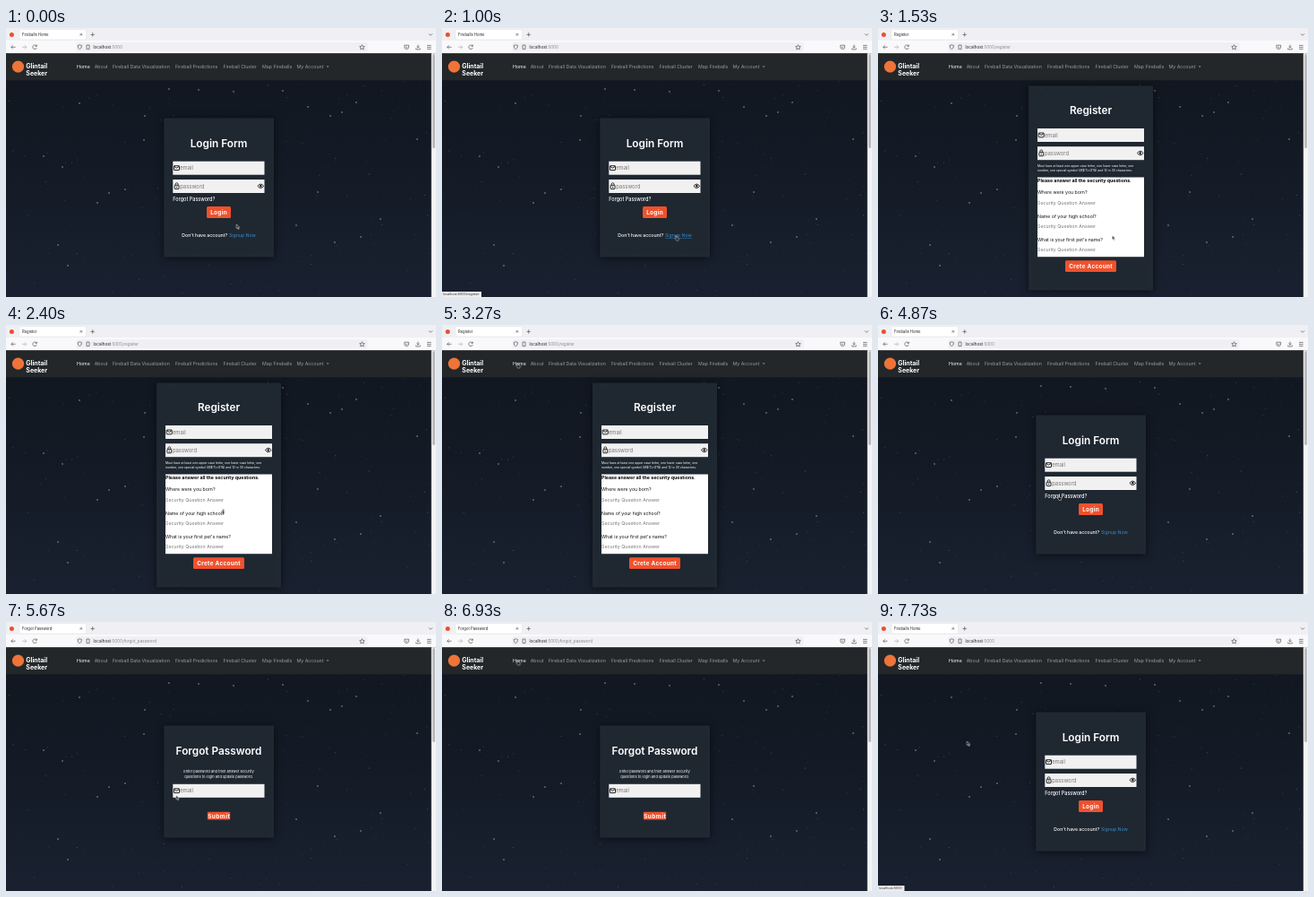
An HTML page for the animation above (7.79 s loop, 480 by 300 pixels).

```html
<!DOCTYPE html>
<html lang="en">
<head>
<meta charset="utf-8">
<title>Login walkthrough</title>
<style>
html, body { margin: 0; width: 100%; height: 100%; overflow: hidden; }
svg { display: block; width: 480px; height: 300px; font-family: Inter, sans-serif; }
.mid { text-anchor: middle; }
.title { font-size: 11.8px; font-weight: 600; fill: #fff; text-anchor: middle; }
.nav { font-size: 5.25px; fill: #9b9d9e; }
.brand { font-size: 7px; font-weight: 700; fill: #fff; }
.hint { font-size: 5.9px; fill: #777; }
.note { font-size: 3.4px; fill: #fff; }
.btn { font-size: 6.4px; font-weight: 700; fill: #fff; letter-spacing: .3px; text-anchor: middle; }
.bar { font-size: 4.6px; fill: #222; }
.tab { font-size: 4.2px; fill: #222; }
.status { font-size: 3.65px; fill: #333; }
.ask { font-size: 5.2px; fill: #111; }
.answer { font-size: 5.3px; fill: #777; }
.card { fill: #222a34; fill-opacity: .93; filter: drop-shadow(0 1px 4px #0009); }
.line { fill: none; stroke: #555; stroke-width: .7; }

.page, .status-box, .shape, #hover { animation: 7790ms step-end infinite; opacity: 0; }
.login { animation-name: login; }
.register { animation-name: register; }
.forgot { animation-name: forgot; }
.to-register { animation-name: to-register; }
.to-home { animation-name: to-home; }
.to-forgot { animation-name: to-forgot; }
.arrow { animation-name: arrow; }
.hand { animation-name: hand; }
.beam { animation-name: beam; }
#hover { animation-name: hover; }
#cursor { animation: move 7790ms ease-in-out infinite; }

@keyframes login { 0%, 44.2%, 93.1% { opacity: 1 } 17.1%, 70.2% { opacity: 0 } 100% { opacity: 1 } }
@keyframes register { 0%, 44.2%, 100% { opacity: 0 } 17.1% { opacity: 1 } }
@keyframes forgot { 0%, 93.1%, 100% { opacity: 0 } 70.2% { opacity: 1 } }
@keyframes to-register { 0%, 17.9%, 100% { opacity: 0 } 10.2% { opacity: 1 } }
@keyframes to-home { 0%, 53.1% { opacity: 0 } 42%, 90.2%, 100% { opacity: 1 } }
@keyframes to-forgot { 0%, 71%, 100% { opacity: 0 } 65.1% { opacity: 1 } }
@keyframes hover { 0%, 17.1%, 100% { opacity: 0 } 9.4% { opacity: 1 } }
@keyframes arrow {
  0%, 17.5%, 33.5%, 46%, 71%, 94% { opacity: 1 }
  9.4%, 27%, 40.5%, 57.3%, 84% { opacity: 0 }
  100% { opacity: 1 }
}
@keyframes hand {
  0%, 17.5%, 46%, 71%, 94%, 100% { opacity: 0 }
  9.4%, 40.5%, 57.3%, 84% { opacity: 1 }
}
@keyframes beam { 0%, 33.5%, 100% { opacity: 0 } 27% { opacity: 1 } }
@keyframes move {
  0%, 1% { transform: translate(257.3px, 219px) }
  10%, 20.5% { transform: translate(261.5px, 231.5px) }
  28%, 32% { transform: translate(242.5px, 206.5px) }
  41%, 45% { transform: translate(84.5px, 42.5px) }
  49%, 52.2% { transform: translate(113.4px, 158px) }
  58.2%, 64% { transform: translate(202px, 190px) }
  68%, 75.4% { transform: translate(189.8px, 193.2px) }
  84.7%, 94.5% { transform: translate(84.5px, 42.5px) }
  98.5%, 100% { transform: translate(99.4px, 133px) }
}
</style>
</head>
<body>
<svg viewBox="0 0 480 300">
  <defs>
    <linearGradient id="sky" x2="0" y2="1">
      <stop offset="0" stop-color="#10161e"/>
      <stop offset=".5" stop-color="#131a25"/>
      <stop offset="1" stop-color="#192130"/>
    </linearGradient>
    <g id="mail">
      <rect x=".6" y="-2.3" width="6" height="4.8" rx=".5" fill="none" stroke="#111" stroke-width=".9"/>
      <path d="M.8-1.8 3.6.2 6.4-1.8" fill="none" stroke="#111" stroke-width=".9"/>
    </g>
    <g id="lock">
      <rect x="1.3" y="-1" width="4.8" height="4.2" rx=".5" fill="none" stroke="#111" stroke-width=".9"/>
      <path d="M2.3-1V-2.2a1.4 1.4 0 0 1 2.8 0V-1" fill="none" stroke="#111" stroke-width=".8"/>
      <circle cx="3.7" cy="1.1" r=".7" fill="#111"/>
    </g>
    <g id="eye">
      <path d="M-3.4 0Q0-4.4 3.4 0 0 4.4-3.4 0Z" fill="none" stroke="#111" stroke-width=".9"/>
      <circle r="1.2" fill="#111"/>
    </g>
  </defs>

  <rect width="480" height="300" fill="url(#sky)"/>
  <g id="stars"></g>

  <!-- Browser -->
  <rect width="480" height="14" fill="#f0f0f4"/>
  <rect y="14" width="480" height="14.5" fill="#f9f9fb"/>
  <rect x="15" y="1.5" width="74.5" height="11.5" rx="1.5" fill="#fff" stroke="#d8d8de" stroke-width=".4"/>
  <circle cx="6.4" cy="7.4" r="2.5" fill="#e8502f"/>
  <rect x="78.5" y="16.2" width="325" height="10" rx="1.5" fill="#f0f0f4"/>
  <g class="line">
    <path d="M82.6 6l2.6 2.6m0-2.6-2.6 2.6M94.5 7.4h4.4m-2.2-2.2v4.4M472 6.3l2 2 2-2"/>
    <path d="M10.6 21.3H5.8m2-2-2 2 2 2"/>
    <path d="M18 21.3h4.8m-2-2 2 2-2 2" stroke="#b0b0b5"/>
    <path d="M34 20a2.3 2.3 0 1 0 .3 2M34.4 18.6v1.8h-1.8"/>
    <path d="M82.3 18.8l2.2.7q0 3.2-2.2 4.4-2.2-1.2-2.2-4.4zM90 19h3v4.6h-3z"/>
    <path d="M397.5 18.7l.8 1.8 2 .2-1.5 1.3.4 2-1.7-1-1.7 1 .4-2-1.5-1.3 2-.2z"/>
    <path d="M444.8 19.2h4.8v2a2.4 2.4 0 0 1-4.8 0zM446 20.8l1.2 1.1 1.2-1.1"/>
    <path d="M460 18.5v3.6m-1.6-1.5 1.6 1.6 1.6-1.6M457.7 22.5v1.4h4.6v-1.4"/>
    <path d="M470 19.4h4.6m-4.6 2h4.6m-4.6 2h4.6"/>
  </g>

  <!-- Navigation -->
  <rect y="28.3" width="475" height="30" fill="#232729"/>
  <circle cx="13.5" cy="43.2" r="6.6" fill="#ee7439"/>
  <text class="brand" x="22.3" y="45.4">Glintail</text>
  <text class="brand" x="22.3" y="53.4">Seeker</text>
  <g id="nav"></g>
  <path d="M357.7 42.5h2.8l-1.4 1.6z" fill="#9b9d9e"/>
  <rect x="474.8" y="28.3" width="5.2" height="272" fill="#f3f3f3"/>
  <rect x="476" y="29" width="3" height="105" rx="1.5" fill="#bcbcbe"/>

  <g class="page login">
    <text class="tab" x="18" y="9">Fireballs Home</text>
    <text class="bar" x="97.5" y="23">localhost<tspan fill="#888">:5000</tspan></text>
    <rect class="card" x="176.3" y="100.5" width="122.7" height="155" rx="1"/>
    <text class="title" x="237.5" y="132.8">Login Form</text>
    <g data-field="186.3 148.7 102.2 mail"></g>
    <g data-field="186.3 169 102.2 lock"></g>
    <text x="186.3" y="193.2" font-size="5.5" font-weight="500" fill="#fff">Forgot Password?</text>
    <rect x="224" y="199" width="27" height="13" rx="1.5" fill="#f0512d"/>
    <text class="btn" x="237.6" y="207.8">Login</text>
    <text x="196.3" y="233.3" font-size="5.2" font-weight="500" fill="#fff">Don't have account?</text>
    <text x="249" y="233.3" font-size="5.2" fill="#3b8ccc">Signup Now</text>
    <path id="hover" d="M249 234.3h29.5" stroke="#3b8ccc" stroke-width=".5"/>
  </g>

  <g class="page register">
    <text class="tab" x="18" y="9">Register</text>
    <text class="bar" x="97.5" y="23">localhost<tspan fill="#888">:5000/register</tspan></text>
    <rect class="card" x="168" y="64.5" width="139" height="228" rx="1"/>
    <text class="title" x="237.5" y="96">Register</text>
    <g data-field="178 112 119 mail"></g>
    <g data-field="178 132.2 119 lock"></g>
    <text class="note" x="178" y="154.8">Must have at least one upper case letter, one lower case letter, one</text>
    <text class="note" x="178" y="159.8">number, one special symbol (@$!%*#?&amp;) and 12 to 30 characters.</text>
    <rect x="178" y="166.5" width="119" height="88.7" fill="#fff"/>
    <text x="178" y="172.3" font-size="5.25" font-weight="700">Please answer all the security questions.</text>
    <g id="questions"></g>
    <rect x="209" y="259.2" width="57" height="12.8" rx="1.5" fill="#f0512d"/>
    <text class="btn" x="237.6" y="267.8">Crete Account</text>
  </g>

  <g class="page forgot">
    <text class="tab" x="18" y="9">Forgot Password</text>
    <text class="bar" x="97.5" y="23">localhost<tspan fill="#888">:5000/forgot_password</tspan></text>
    <rect class="card" x="176.3" y="115.5" width="122.7" height="125" rx="1"/>
    <text class="title" x="237.5" y="147.5">Forgot Password</text>
    <text class="mid" x="237.5" y="168" font-size="4" fill="#fff">Enter password and then answer security</text>
    <text class="mid" x="237.5" y="174" font-size="4" fill="#fff">questions to login and update password.</text>
    <g data-field="186.3 180.8 102.2 mail"></g>
    <rect x="224.8" y="211.8" width="25.4" height="8.8" rx="1" fill="#f0512d"/>
    <text class="btn" x="237.7" y="218.5" style="letter-spacing:.5px">Submit</text>
  </g>

  <g class="status-box to-register">
    <rect y="294" width="44" height="6" fill="#ededf0"/>
    <text class="status" x="1.2" y="298.3">localhost:5000/register</text>
  </g>
  <g class="status-box to-home">
    <rect y="294" width="29.5" height="6" fill="#ededf0"/>
    <text class="status" x="1.2" y="298.3">localhost:5000</text>
  </g>
  <g class="status-box to-forgot">
    <rect y="294" width="57" height="6" fill="#ededf0"/>
    <text class="status" x="1.2" y="298.3">localhost:5000/forgot_password</text>
  </g>

  <g id="cursor">
    <path class="shape arrow" d="M0 0v4.5l1.1-.9.9 1.9.8-.4-.9-1.8h1.4z" fill="#111" stroke="#fff" stroke-width=".5"/>
    <path class="shape hand" d="M-.6.2q.6-.6 1 0v1.9l2 .5q.5.3.4 1L2.3 5.4H0L-1.4 3.3q.1-.6.8-.2z" fill="#111" stroke="#fff" stroke-width=".5"/>
    <path class="shape beam" d="M-1-.4q1 0 1 .7v3.4q0 .7-1 .7M1-.4Q0-.4 0 .3v3.4q0 .7 1 .7" fill="none" stroke="#222" stroke-width=".7"/>
  </g>
</svg>
<script>
const $ = id => document.getElementById(id);
const label = (cls, x, y, text) => `<text class="${cls}" x="${x}" y="${y}">${text}</text>`;

$('nav').innerHTML = [
  [79, 'Home'], [98.7, 'About'], [119, 'Fireball Data Visualization'],
  [189, 'Fireball Predictions'], [242.6, 'Fireball Cluster'],
  [286, 'Map Fireballs'], [324.5, 'My Account']
].map(([x, text], i) => label(i ? 'nav' : 'nav" style="fill:#fff', x, 45, text)).join('');

$('questions').innerHTML = [
  'Where were you born?', 'Name of your high school?', "What is your first pet's name?"
].map((text, i) => {
  const y = 185.4 + i * 26.4;
  return label('ask', 178, y, text) + label('answer', 178, y + 11.2, 'Security Question Answer');
}).join('');

for (const field of document.querySelectorAll('[data-field]')) {
  const [x, y, w, icon] = field.dataset.field.split(' ');
  const secret = icon === 'lock';
  field.setAttribute('transform', `translate(${x} ${y})`);
  field.innerHTML = `<rect width="${w}" height="15" fill="#f1f1f2"/>
    <use href="#${icon}" x=".6" y="7.3"/>
    ${label('hint', 7.9, 9.6, secret ? 'password' : 'email')}
    ${secret ? `<use href="#eye" x="${w - 4.2}" y="7.3"/>` : ''}`;
}

let seed = 11;
const rand = () => (seed = seed * 16807 % 2147483647) / 2147483647;
const star = (x, y, r, o) => `<circle cx="${x}" cy="${y}" r="${r}" fill="#dfe5ee" opacity="${o}"/>`;
const bright = [
  [154, 125], [182, 68], [215, 69], [254, 71], [309, 70], [337, 88], [362, 98], [375, 94],
  [391, 83], [42, 143], [63, 155], [102, 195], [133, 180], [115, 184], [69, 265], [58, 242],
  [367, 239], [396, 233], [418, 213], [348, 183], [324, 220], [459, 124], [155, 98], [82, 84]
];
let sky = bright.map(([x, y]) => star(x, y, .65, .8)).join('');
for (let i = 0; i < 190; i++) {
  sky += star(rand() * 475, 58 + rand() * 242, .25 + rand() * .25, .15 + rand() * .4);
}
$('stars').innerHTML = sky;
</script>
</body>
</html>
```
